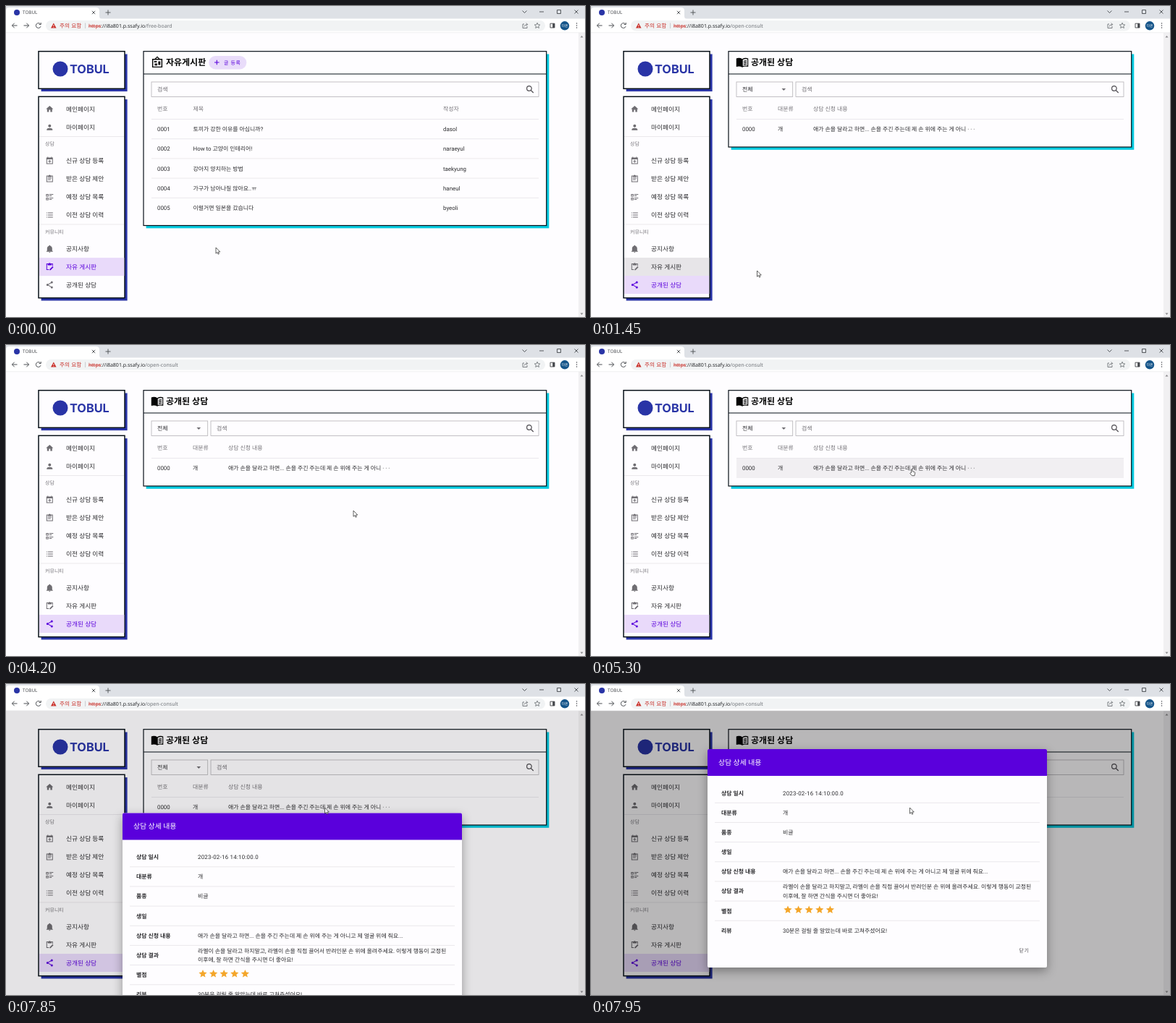
These frames come from a looping animation (800x430 px, 8000 ms). An HTML page:

```html
<!DOCTYPE html>
<html lang="ko">
<head>
<meta charset="utf-8">
<title>TOBUL</title>
<style>
  html, body { margin: 0; width: 100%; height: 100%; overflow: hidden; background: #fefdff; }
  svg { display: block; width: 800px; height: 430px; }
  text { font-family: Roboto, "Noto Sans CJK KR", "Noto Sans CJK", sans-serif; text-rendering: geometricPrecision; white-space: pre; }
  .ui { font-family: "Noto Sans", "Noto Sans CJK KR", "Noto Sans CJK", sans-serif; }
  .logo { font-family: Inter, sans-serif; }
  #modal { filter: drop-shadow(0 5px 7px rgba(0, 0, 0, .35)); }
</style>
</head>
<body>
<svg id="stage" viewBox="0 0 800 430" xmlns="http://www.w3.org/2000/svg"></svg>
<script>
const PURPLE = '#5a00dc', INK = '#2b2b2e', GREY = '#77757a', NAVY = '#2934a6', CYAN = '#06cbe0';
const LOOP = 8000, STEP = 50;

const ICONS = {
  home: 'M10 20V14H14V20H19V12H22L12 3L2 12H5V20Z',
  user: 'M12 4a4 4 0 0 1 0 8a4 4 0 0 1 0-8M12 14c4.4 0 8 1.8 8 4v2H4v-2c0-2.200 3.600-4 8-4z',
  plan: 'M19 19V8H5V19ZM16 1h2v2h3v18H3V3h3V1h2v2h8zM11 9.500h2v3h3v2h-3v3h-2v-3H8v-2h3z',
  clip: 'M21 3H14.800a3 3 0 0 0-5.600 0H3V21H21ZM5 5H7V7H17V5H19V19H5ZM7 9H17V11H7ZM7 13H15V15H7Z',
  rows: 'M2 4H9V11H2ZM4 6V9H7V6ZM11 4H22V6H11ZM11 8H18V10H11ZM2 14H9V21H2ZM4 16V19H7V16ZM11 14H22V16H11ZM11 18H18V20H11Z',
  list: 'M3 5H5V7H3ZM3 11H5V13H3ZM3 17H5V19H3ZM7 5H21V7H7ZM7 11H21V13H7ZM7 17H21V19H7Z',
  bell: 'M21 19v1H3v-1l2-2v-6c0-3 2-5.800 5-6.700a2 2 0 1 1 4 0c3 .9 5 3.700 5 6.700v6zM14 21a2 2 0 0 1-4 0',
  edit: 'M21 10V3H14.800a3 3 0 0 0-5.600 0H3V21H10V19H5V5H7V8H17V5H19V10ZM12 19L20 11L22.500 13.500L14.500 21.500H12Z',
  share: 'M18 2a3 3 0 0 1 0 6a3 3 0 0 1 0-6M6 9a3 3 0 0 1 0 6a3 3 0 0 1 0-6M18 16a3 3 0 0 1 0 6a3 3 0 0 1 0-6M8 9.800L15 5.700L16 7.400L9 11.500ZM9 12.500L16 16.600L15 18.300L8 14.200Z',
  board: 'M12 2.500L9.500 5H14.500ZM4 7V20H20V7ZM12 0L17 5H22V22H2V5H7ZM7 18V14H12V18ZM14 17V10H18V17ZM6 12V9H11V12Z',
  book: 'M1 4.500Q7 2.500 12 5.500Q17 2.500 23 4.500V20Q17 18 12 21Q7 18 1 20ZM13 7V18.500Q17 17 21.500 18V6Q17 5 13 7ZM14.500 9Q17 8 20 8.300V10Q17 9.500 14.500 10.500ZM14.500 12Q17 11 20 11.300V13Q17 12.500 14.500 13.500ZM14.500 15Q17 14 20 14.300V16Q17 15.500 14.500 16.500Z',
  star: 'M12 17.300L18.200 21L16.500 14L22 9.200L14.800 8.600L12 2L9.200 8.600L2 9.200L7.500 14L5.800 21Z'
};

// Small builders; every text is placed by the middle of its line.
const rect = (x, y, w, h, fill, more = '') => `<rect x="${x}" y="${y}" width="${w}" height="${h}" fill="${fill}" ${more}/>`;
const line = (d, color, width = 1, more = '') => `<path d="${d}" fill="none" stroke="${color}" stroke-width="${width}" ${more}/>`;
const rule = (x1, x2, y, color = '#e2e0e4') => line(`M${x1} ${y}H${x2}`, color, .7);
const text = (x, y, s, size = 7.9, fill = INK, more = '') =>
  `<text x="${x}" y="${y + size * .36}" font-size="${size}" fill="${fill}" ${more}>${s}</text>`;
const icon = (name, cx, cy, size, fill) =>
  `<path d="${ICONS[name]}" fill="${fill}" fill-rule="${name === 'share' ? 'nonzero' : 'evenodd'}" transform="translate(${cx - size / 2} ${cy - size / 2}) scale(${size / 24})"/>`;
const box = (x, y, w, h, shade, width) =>
  rect(x + 3.6, y + 3.8, w, h, shade) + rect(x, y, w, h, '#fefdff', `stroke="#071018" stroke-width="${width}"`);
const group = (id, body, more = '') => `<g id="${id}" ${more}>${body}</g>`;
const bold = 'font-weight="700"';

function browser() {
  const dark = '#4b4e52';
  const url = (id, path) => `<text id="${id}" class="ui" x="114" y="30" font-size="7" fill="#707479">` +
    `<tspan fill="#c9312b" text-decoration="line-through">https</tspan><tspan fill="#26282b">://i8a801.p.ssafy.io</tspan>${path}</text>`;
  return rect(0, 0, 800, 18, '#dee1e6') + rect(0, 17.500, 800, 19.500, '#fff') +
    '<path d="M0 18V6Q0 2 5 2H124Q129 2 129 6V14Q129 18 133 18Z" fill="#fff"/>' +
    `<circle cx="15" cy="9" r="4" fill="${NAVY}"/>` +
    text(23, 9, 'TOBUL', 6.3, '#45484d', 'class="ui"') +
    line('M118.800 6.800l4.400 4.400m0-4.400l-4.400 4.400M137.500 9h7m-3.500-3.500v7', dark, .9) +
    line('M713.500 6.500l3 3l3-3M737 8h6M761.500 5.500h5v5h-5zM785.500 5.500l5 5m0-5l-5 5', '#33363a', .8) +
    line('M15.500 27H8.500m3.200-3.300L8.400 27l3.300 3.300M24.500 27h7m-3.200-3.300l3.300 3.300l-3.300 3.300', dark, 1) +
    line('M47.500 25A3.400 3.400 0 1 0 48 28.200M48.200 23v2.600h-2.600', dark, 1) +
    rect(55, 20, 690, 14.500, '#f1f3f4', 'rx="7.2"') +
    '<path d="M65.800 23.600L69.600 30.600H62Z" fill="#c9312b"/>' + line('M65.800 26v2.300m0 .7v.8', '#fff', .8) +
    text(74, 27, '주의 요함', 7.700, '#c9312b', 'class="ui"') + rect(109, 23.500, .7, 7.500, '#b9bcc0') +
    url('urlA', '/free-board') + url('urlB', '/open-consult') +
    line('M716 25h-2v5.500h6v-2.500M716 28.500q.5-3 4.500-3m-1.800-2l2 2l-2 2', '#5f6368', .8) +
    `<path d="${ICONS.star}" transform="translate(729.500 22.500) scale(.38)" fill="none" stroke="#5f6368" stroke-width="2"/>` +
    line('M752 24.200h6v5.800h-6z', '#44474b', .9) + rect(755.200, 24.200, 2.800, 5.800, '#44474b') +
    '<circle cx="772" cy="27.300" r="6.200" fill="#145489"/>' + text(772, 27.300, '다온', 5, '#fff', 'text-anchor="middle"') +
    [24, 27, 30].map(y => `<circle cx="788.500" cy="${y}" r=".8" fill="#4b4e52"/>`).join('') +
    rect(0, 36.600, 800, .6, '#e3e3e5');
}

const MENU = [
  ['home', '메인페이지', 142.5], ['user', '마이페이지', 167.7],
  ['plan', '신규 상담 등록', 214], ['clip', '받은 상담 제안', 239],
  ['rows', '예정 상담 목록', 264], ['list', '이전 상담 이력', 289],
  ['bell', '공지사항', 335.7], ['edit', '자유 게시판', 360.6], ['share', '공개된 상담', 385.5]
];
const entry = ([name, label, y], on) =>
  (on ? rect(46, y - 12.500, 117.300, 25, '#e9dafa') : '') +
  icon(name, 60.300, y, 12, on ? PURPLE : '#6f6d72') + text(83, y, label, 8.700, on ? PURPLE : INK);

function sidebar() {
  return box(45, 62.700, 119, 51.600, NAVY, 1.500) +
    `<circle cx="75" cy="87" r="10.500" fill="${NAVY}"/>` +
    text(88, 87, 'TOBUL', 16.300, NAVY, 'class="logo" ' + bold) +
    box(45, 125.300, 119, 278.300, NAVY, 1.500) +
    rule(46, 163, 180.500) + rule(46, 163, 302) +
    text(54, 190.500, '상담', 7, GREY) + text(54, 312, '커뮤니티', 7, GREY) +
    MENU.slice(0, 7).map(m => entry(m)).join('') +
    group('menuA', entry(MENU[7], true) + entry(MENU[8])) +
    group('menuB', rect(46, 348, 117.300, 25, '#e5e3e6', 'id="hover"') + entry(MENU[7]) + entry(MENU[8], true));
}

function panel(h, name, title) {
  return box(190, 62.700, 556.700, h, CYAN, 1.200) + line('M190 94H746.500', '#071018', 1.200) +
    icon(name, 209, 78, name === 'board' ? 17 : 18, '#050505') + text(221, 78, title, 12, '#050505', bold);
}
function search(x) {
  return rect(x, 105, 736 - x, 20.500, 'none', 'stroke="#b4b2b6" stroke-width=".8"') +
    text(x + 8, 115.200, '검색', 7.900, '#69676c') +
    line('M726.200 114a3.300 3.300 0 1 0-6.600 0a3.300 3.300 0 1 0 6.600 0M725.200 116.400l3.500 3.600', '#4d4b50', 1.200);
}
const cells = (y, row, xs, color) => row.map((s, i) => text(xs[i], y, s, 7.9, color)).join('');

function freeBoard() {
  const xs = [209, 258.5, 604];
  const rows = [
    ['0001', '토끼가 강한 이유를 아십니까?', 'dasol'],
    ['0002', 'How to 고양이 인테리어!', 'naraeyul'],
    ['0003', '강아지 양치하는 방법', 'taekyung'],
    ['0004', '가구가 남아나질 않아요..ㅠ', 'haneul'],
    ['0005', '이럴거면 일본을 갔습니다', 'byeoli']
  ];
  return panel(240.800, 'board', '자유게시판') +
    rect(280.300, 69, 52, 18.500, '#e9dcfa', 'rx="9.200"') + line('M288 78h6.600m-3.300-3.300v6.600', PURPLE, 1.100) +
    text(301, 78.200, '글 등록', 6.900, PURPLE, 'letter-spacing=".7"') + search(201) +
    cells(142, ['번호', '제목', '작성자'], xs, GREY) +
    rows.map((r, i) => rule(201, 736, 156.500 + i * 27.200) + cells(170.300 + i * 27.200, r, xs, INK)).join('');
}

function consult() {
  const xs = [209, 258, 307];
  return panel(132.300, 'book', '공개된 상담') +
    rect(201, 105, 77.700, 20.500, 'none', 'stroke="#b4b2b6" stroke-width=".8"') +
    text(209, 115.200, '전체') + '<path d="M263.500 114h5.600l-2.800 2.900z" fill="#6f6d72"/>' + search(283) +
    rect(201, 157, 535, 27, '#f1eff2', 'id="rowHover"') +
    cells(142, ['번호', '대분류', '상담 신청 내용'], xs, GREY) + rule(201, 736, 156.500) +
    cells(170.400, ['0000', '개', '애가 손을 달라고 하면... 손을 주긴 주는데 제 손 위에 주는 게 아니 · · ·'], xs, INK);
}

// Drawn with its top edge at zero.
function dialog() {
  const rows = [
    ['상담 일시', '2023-02-16 14:10:00.0'], ['대분류', '개'], ['품종', '비글'], ['생일', ''],
    ['상담 신청 내용', '애가 손을 달라고 하면... 손을 주긴 주는데 제 손 위에 주는 게 아니고 제 얼굴 위에 줘요...'],
    ['상담 결과', ''], ['별점', ''], ['리뷰', '30분은 걸릴 줄 알았는데 바로 고쳐주셨어요!']
  ];
  const stars = [0, 1, 2, 3, 4].map(i => icon('star', 272 + i * 14.600, 222, 13.500, '#f4a62a')).join('');
  return rect(161, 0, 469, 302, '#fefdff', 'rx="2"') +
    `<path d="M161 37V2Q161 0 163 0H628Q630 0 630 2V37Z" fill="${PURPLE}"/>` +
    text(176, 18, '상담 상세 내용', 9.900, '#fff') +
    rows.map(([k, v], i) => {
      const y = 60.800 + i * 27.150;
      return text(180, y, k, 7.900, INK, bold) + text(265, y, v, 7.900, INK, i ? '' : 'letter-spacing=".25"') +
        (i < 7 ? rule(171, 620, y + 13.500) : '');
    }).join('') +
    text(265, 190.300, '라멜이 손을 달라고 하지말고, 라멜이 손을 직접 끌어서 반려인분 손 위에 올려주세요. 이렇게 행동이 교정된') +
    text(265, 203, '이후에, 잘 하면 간식을 주시면 더 좋아요!') + stars +
    text(591.500, 278, '닫기', 7, '#4d4b50', 'letter-spacing=".5"');
}

const stage = document.getElementById('stage');
stage.innerHTML = rect(0, 37, 800, 393, '#fefdff') + rect(791, 37, 9, 393, '#f1f0f2') +
  '<path d="M793.500 43.500h4l-2-2.500zM793.500 424.500h4l-2 2.500z" fill="#8a898c"/>' +
  sidebar() + group('pageA', freeBoard()) + group('pageB', consult()) +
  rect(0, 37, 800, 393, '#000', 'id="scrim"') + group('modal', dialog()) + browser() +
  group('arrow', '<path d="M0 0V8.200L1.900 6.500L3.100 9.200L4.400 8.600L3.200 6H5.800Z" fill="#fff" stroke="#222" stroke-width=".7"/>') +
  group('hand', '<path d="M2 5.800V1Q2.800-.3 3.600 1V3.800L6.700 4.700Q7.400 5 7.200 6L6.500 9.700H3L.3 6.600Q.6 5.300 2 5.800Z" fill="#fff" stroke="#222" stroke-width=".7"/>');

const el = {};
stage.querySelectorAll('[id]').forEach(n => el[n.id] = n);

const CURSOR = [
  [100, 290, 334], [500, 195, 366], [850, 102, 389], [1150, 102, 386], [1300, 140, 376], [1350, 158, 371],
  [1450, 229.5, 366], [1750, 330, 326], [2200, 410, 287], [2550, 439, 277], [2600, 449.5, 275],
  [2750, 507, 246], [2950, 469, 226], [3400, 469, 226], [3450, 469.5, 225.5], [3850, 470, 226], [4050, 472, 227],
  [4200, 480, 229], [4450, 514, 238], [4850, 456, 210], [5100, 446, 180], [5300, 440.5, 171]
];
const HOVER = [[1300, 0], [1400, 1], [1450, .9], [1750, 0]];
const SCRIM = [[7700, 0], [7800, .04], [7850, .1], [7950, .28]];
const RISE = [[7700, 440], [7750, 400], [7800, 285], [7850, 178.5], [7900, 124], [7950, 90]];

function at(keys, t, k = 1) {
  if (t <= keys[0][0]) return keys[0][k];
  for (let i = 1; i < keys.length; i++) {
    const a = keys[i - 1], b = keys[i];
    if (t <= b[0]) return a[k] + (b[k] - a[k]) * (t - a[0]) / (b[0] - a[0]);
  }
  return keys[keys.length - 1][k];
}
const show = (n, on) => n.setAttribute('visibility', on ? 'visible' : 'hidden');
const move = (n, x, y) => n.setAttribute('transform', `translate(${x} ${y})`);

function draw(t) {
  const x = at(CURSOR, t), y = at(CURSOR, t, 2);
  const second = t >= 1050, open = t >= 7750;
  const onMenu = x > 46 && x < 163 && y > 348 && y < 398;
  const onRow = second && !open && x > 201 && y > 157 && y < 184;
  for (const part of ['page', 'menu', 'url']) {
    show(el[part + 'A'], !second);
    show(el[part + 'B'], second);
  }
  show(el.rowHover, onRow);
  el.hover.setAttribute('opacity', at(HOVER, t));
  el.scrim.setAttribute('opacity', at(SCRIM, t));
  show(el.modal, open);
  move(el.modal, 0, at(RISE, t));
  show(el.hand, onMenu || onRow);
  show(el.arrow, !onMenu && !onRow);
  move(el.hand, x, y);
  move(el.arrow, x, y);
}

const start = performance.now();
function tick() {
  const t = (performance.now() - start) % LOOP;
  draw(Math.floor(t / STEP) * STEP);
  requestAnimationFrame(tick);
}
tick();
</script>
</body>
</html>
```
